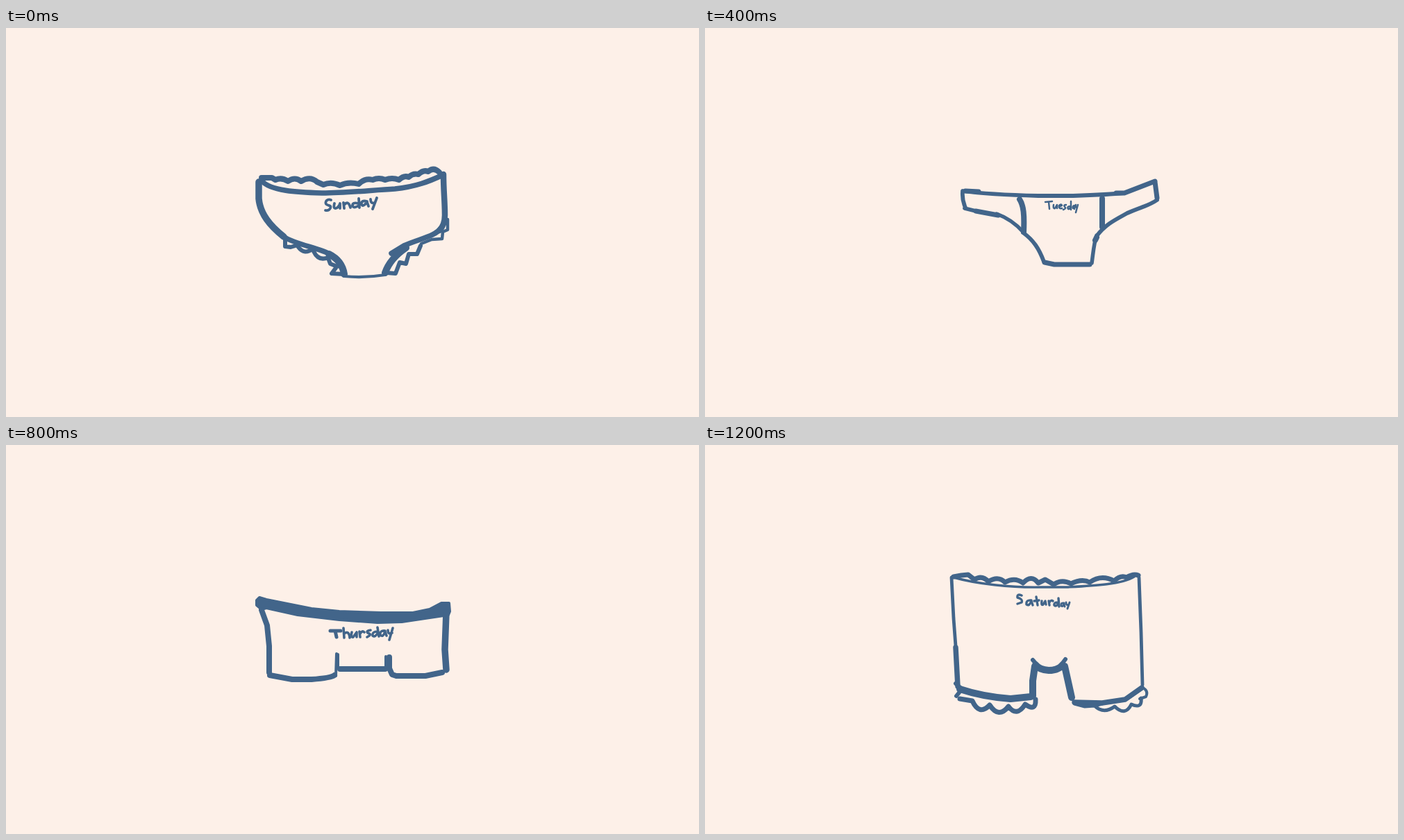
Recreate the animation shown at these times as an HTML page. Size 998x561 px, loop 1.4 s.

```html
<!DOCTYPE html>
<html lang="en">
<head>
<meta charset="utf-8">
<title>Days of the week</title>
<style>
html, body { margin: 0; width: 100%; height: 100%; overflow: hidden; background: #fdf0e8; }
svg { display: block; width: 100%; height: 100%; fill: none; stroke: #42658a; stroke-linecap: round; stroke-linejoin: round; }
g { visibility: hidden; }
g.on { visibility: visible; }
.band { fill: #42658a; }
</style>
</head>
<body>
<svg viewBox="0 0 998 561">

<g class="on" aria-label="Sunday">
  <path stroke-width="9.5" d="M364 222V246C366 268 380 285 400 301"/>
  <path stroke-width="8.5" d="M630 211C630 235 632 250 632 270Q632 284 624 292"/>
  <path stroke-width="7.5" d="M368 220C380 235 420 237 455 238C490 238 525 234 560 232C590 229 610 221 629 212"/>
  <path stroke-width="8" d="M368 216L383 216L388 219Q397 215 406 221Q416 214 425 221Q438 213 448 222L457 226Q468 221 481 227Q493 221 508 225Q517 216 528 219Q537 215 546 219Q556 215 566 219Q573 212 580 215Q586 209 594 211Q601 204 608 207Q616 200 624 208"/>
  <path stroke-width="7.5" d="M400 301C418 313 452 317 468 327M555 325L573 314C594 304 618 301 627 288"/>
  <path stroke-width="10" d="M465 326C477 332 485 342 487 355M546 353C550 341 560 328 576 317"/>
  <path stroke-width="4" d="M487 358Q515 361 546 356"/>
  <path stroke-width="6" d="M402 302L402 315L410 316L420 313M421 316Q430 328 442 318M443 322Q450 337 464 331M464 332L467 340L477 344M475 346L469 354L487 355M548 353L561 354L567 338L576 340L580 326L592 326L597 314"/>
  <path stroke-width="4.5" d="M598 311L613 305L628 304L629 294L636 291V276"/>
  <path stroke-width="3.8" d="M468 248C463 246 459 250 461 254C464 257 469 255 467 260Q465 264 460 263M473 253Q471 261 475 260Q479 259 481 253V260M486 252L487 260M487 255Q493 248 496 259M507 253Q499 251 499 256Q500 261 508 256M508 246L509 259M520 250Q511 248 512 254Q514 259 520 251L522 257M525 247Q525 254 531 252M534 245L528 261"/>
</g>

<g aria-label="Monday">
  <path stroke-width="6.5" d="M357 197L370 206C390 215 425 218 462 220Q480 221 528 221C565 219 600 210 634 199"/>
  <path stroke-width="5" d="M355 199H364M360 195L369 202M363 201L366 206"/>
  <path stroke-width="4" d="M366 206C372 230 381 252 383 279M551 365C551 340 552 319 559 301"/>
  <path stroke-width="7.5" d="M384 279L425 278C445 279 457 284 463 289M503 358L526 357.5L549 364M636 200C635 220 637 240 641 257"/>
  <path stroke-width="5.5" d="M463 288C478 304 501 332 502 356"/>
  <path stroke-width="6.5" d="M559 301C565 291 582 284 597 274C612 265 622 259 642 259"/>
  <path stroke-width="3.6" d="M483 244L485 234L490 242L496 234L498 245M506 238Q501 242 504 246Q510 248 511 242Q510 237 505 238M514 237L515 245M515 240Q521 234 523 243M534 235Q526 235 527 240Q530 244 535 237M534 230L535 242M545 234Q537 233 538 239Q541 243 545 235L547 241M549 233Q549 240 555 237M557 232L552 247"/>
</g>

<g aria-label="Tuesday">
  <path stroke-width="5.8" d="M371 235C400 239 440 241 480 242H530C560 241 585 240 603 238M371 236Q370 248 375 259M374 260L390 264M458 295C473 306 481 318 488 337M564 300C577 283 590 277 608 267C628 258 640 256 651 248"/>
  <path stroke-width="7" d="M375 235L394 236M592 238H604L648 221M390 264L422 270M489 338L503 341H554M648 222L651 245"/>
  <path stroke-width="5.5" d="M420 268Q442 276 458 294M557 339C559 325 560 310 564 299"/>
  <path stroke-width="8" d="M453 247C459 256 460 270 459 294M572 246V287M564 302L562 306"/>
  <path stroke-width="2.5" d="M490 251L500 250M495 251L496 261M502 255Q501 261 504 260L507 255V260M510 258L514 256Q513 253 510 256Q509 261 514 260M520 255Q516 255 518 258Q521 260 516 262M526 257Q521 257 523 261Q525 262 527 257M527 250V262M532 256Q529 257 530 260Q532 261 532 256V261M534 255Q533 260 536 258M537 255L534 266"/>
</g>

<g aria-label="Wednsday">
  <path stroke-width="4.5" d="M343 247L352 247L359 254Q374 247 387 259Q407 251 427 262Q445 251 464 262Q482 253 501 262Q516 254 531 260Q548 248 565 259Q577 248 590 252Q603 242 615 248Q630 236 641 246L643 261"/>
  <path stroke-width="5.5" d="M643 262Q650 266 648 280V293Q655 296 652 313Q657 318 655 332M344 249Q343 264 350 271Q358 277 353 284Q350 296 358 299Q363 306 361 317"/>
  <path stroke-width="4.8" d="M655 333L645 333Q630 340 618 329Q613 341 588 338Q584 347 571 343L555 347M361 318L371 320L370 333Q374 339 387 340"/>
  <path stroke-width="6" d="M387 342L390 347Q401 349 409 345Q417 352 430 349Q438 352 446 347M555 346L560 353Q561 364 553 364L549 369L540 372"/>
  <path stroke-width="5" d="M444 347H464M540 372Q531 375 525 370Q512 378 500 372Q488 375 477 370Q465 367 458 361L453 350"/>
  <path stroke-width="4.2" d="M448 277L450 293L458 284L463 293L468 276M475 287L483 285Q481 279 476 283Q472 292 483 292M495 284Q487 281 488 290Q492 294 496 286M496 277L497 292"/>
  <path stroke-width="3.5" d="M502 282L503 292M503 285Q509 278 511 292M521 281Q514 281 516 285Q523 287 520 292L515 293M531 284Q524 283 525 290Q529 294 532 285M531 275L533 292M542 283Q535 284 537 291Q542 293 542 283L544 292M546 282Q547 290 552 287M553 278V298"/>
</g>

<g aria-label="Thursday">
  <path class="band" stroke-width="4" d="M361 224L365 220L375 223L440 236L480 240L540 242H586L610 237L627 228L638 228L639 240L637 245L570 255L535 256L480 252L420 245L375 235L368 237L361 231Z"/>
  <path stroke-width="8" d="M368 238L376 260L379 290V328M380 332L412 338H440Q468 336 473 332M481 323H546M552 306V322L556 331L562 333H604L628 328"/>
  <path stroke-width="9.5" d="M634 242L632 295L634 324"/>
  <path stroke-width="4" d="M475 333L476 301M478 302V320M547 305V321"/>
  <path stroke-width="5" d="M467 268H482M474 268L476 277"/>
  <path stroke-width="3.6" d="M486 264L487 278M487 272Q494 267 495 278M498 270Q496 278 500 277L505 270V277M509 269L510 277M510 272Q513 267 516 270M525 267Q518 268 521 271Q528 273 520 277M535 269Q527 269 528 275Q532 278 536 270M535 263L537 276M546 268Q538 267 539 274Q543 278 546 269L548 275M550 267Q550 274 556 271M557 264L552 281"/>
</g>

<g aria-label="Friday">
  <path stroke-width="7.5" d="M357 195C370 203 405 205 450 207H500C560 204 600 198 638 191M362 198Q381 240 380 279M381 279L405 279C421 282 442 294 462 313"/>
  <path stroke-width="6.2" d="M354 188Q350 195 360 197Q373 197 370 186Q359 182 355 188M364 185V195M462 313C477 328 486 352 493 374M562 318C562 301 571 287 584 275C600 265 614 259 629 250H642"/>
  <path stroke-width="9" d="M496 374H536Q549 373 561 367M563 358V316L569 298M639 190V249"/>
  <path stroke-width="5" d="M375 197Q389 188 406 193L410 199Q423 190 438 202M441 203Q446 193 458 195L470 203M472 203Q484 193 498 195M498 202Q501 190 510 192L524 199M527 200Q530 188 539 191L549 199M553 199Q565 189 580 195M584 195Q600 181 607 187L612 190M613 190Q620 183 626 187L633 190L645 187"/>
  <path stroke-width="4" d="M526 215L516 213L518 220L526 215Q531 207 535 212L533 220L526 216L521 231M528 217L533 227"/>
  <path stroke-width="3.5" d="M495 241V253M495 241L504 240M496 246L503 245M508 244V252M508 247Q511 243 515 244M518 245V251M518 239L519 239M528 244Q521 244 522 249Q525 253 529 246M528 238L529 251M537 244Q530 243 531 249Q535 253 537 245L539 250M540 243Q541 250 546 247M547 241L542 256"/>
</g>

<g aria-label="Saturday">
  <path stroke-width="4.8" d="M355 191L358 250L361 290M625 191L628 270L630 346"/>
  <path stroke-width="7.5" d="M361 292L364 348M532 371L572 372L605 367L629 350"/>
  <path stroke-width="3.4" d="M358 191C390 200 440 206 485 205H523C560 203 600 201 618 190"/>
  <path stroke-width="7" d="M358 190L369 188L379 187L388 194Q399 187 408 197Q422 188 432 198Q446 190 458 199Q470 186 480 199L490 194L502 201Q514 193 527 200Q543 192 554 198Q571 186 589 196Q599 187 607 191Q617 185 624 188"/>
  <path stroke-width="10" d="M367 352Q400 363 440 366L469 363M472 362V340L475 319M476 317Q481 324 495 325Q509 325 515 317M518 319L528 364"/>
  <path stroke-width="6" d="M472 310L479 318M519 309L513 317M361 344L370 352L362 362M607 366L629 351"/>
  <path stroke-width="7" d="M367 366L385 369Q395 391 410 375Q423 395 437 377Q449 393 461 374Q477 385 476 367"/>
  <path stroke-width="5" d="M532 373L547 377L561 376Q574 389 590 377Q605 392 614 374Q630 381 628 365M561 376L572 373"/>
  <path stroke-width="4" d="M630 350Q639 354 635 363L626 366"/>
  <path stroke-width="3.4" d="M456 217Q449 214 450 220Q458 222 456 227L450 229M470 224Q462 223 463 230Q467 233 470 225L472 231M477 219L479 231M474 225L481 224M485 225Q484 232 487 230L490 225L491 230M495 225L496 231M496 227Q498 223 501 225M508 227Q502 227 503 231Q506 234 509 228M509 221L510 233"/>
  <path stroke-width="2.9" d="M517 228Q512 227 513 232Q516 234 517 228L518 233M520 227Q520 232 524 230M525 227L522 236"/>
</g>

</svg>
<script>
const days = [...document.querySelectorAll("g")];
const HOLD = 200;

function draw() {
  const today = Math.floor(performance.now() / HOLD) % days.length;
  days.forEach((day, i) => day.classList.toggle("on", i === today));
  requestAnimationFrame(draw);
}
draw();
</script>
</body>
</html>
```
